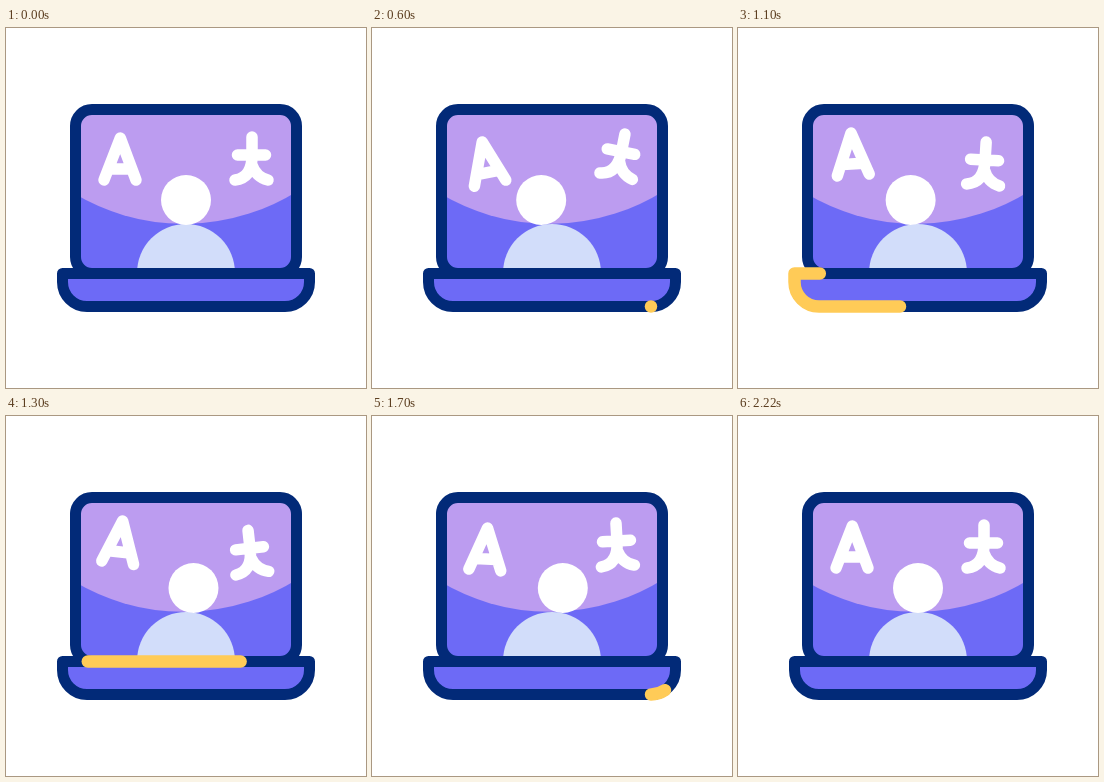
An HTML page for the animation above (2.4 s loop, 360 by 360 pixels).

```html
<!DOCTYPE html>
<html lang="en">
<head>
<meta charset="utf-8">
<title>Online translation</title>
<style>
  html, body { margin: 0; width: 100%; height: 100%; overflow: hidden; background: #fff; }
  svg { display: block; width: 100vw; height: 100vh; }
  .line { fill: none; stroke-linecap: round; stroke-linejoin: round; }
  .navy { stroke: #022a78; stroke-width: 11; }
  .glyph { stroke: #fff; stroke-width: 11.5; }
</style>
</head>
<body>
<svg viewBox="0 0 360 360">
  <defs>
    <clipPath id="screen"><rect x="69.5" y="81.5" width="221" height="164" rx="16.5"/></clipPath>
  </defs>
  <g clip-path="url(#screen)">
    <path fill="#6d6af6" d="M60 70H300V250H60Z"/>
    <path fill="#bc9cf0" d="M60 70H300V157.5A214 214 0 0 1 60 160.500Z"/>
    <circle fill="#d2ddfa" cx="180" cy="245" r="49"/>
  </g>
  <circle id="head" fill="#fff" cy="172" r="25"/>
  <path id="latin" class="line glyph" d="M98 152L114.300 110L130 152M104 141H125"/>
  <path id="hanzi" class="line glyph" d="M246 109V128Q246 150 229 152M231.500 127H259.500M246 137Q250 149 262 152"/>
  <rect class="line navy" x="69.5" y="81.5" width="221" height="164" rx="16.5"/>
  <path class="navy" fill="#6d6af6" stroke-linejoin="round"
    d="M279 278.500H81A24.500 24.500 0 0 1 56.500 254V245.500H303.500V254A24.500 24.500 0 0 1 279 278.500Z"/>
  <path id="runner" class="line" stroke="#ffcb57" stroke-width="12.5" pathLength="1"
    d="M279 278.500H81A24.500 24.500 0 0 1 56.500 254V245.500H303.500V254A24.500 24.500 0 0 1 279 278.500"/>
</svg>
<script>
  const LOOP = 2400;
  const [head, latin, hanzi, runner] =
    ['head', 'latin', 'hanzi', 'runner'].map(id => document.getElementById(id));

  const ease = u => u * u * (3 - 2 * u);

  // Eased value at time t through [time, value] keys.
  function track(t, keys) {
    if (t <= keys[0][0]) return keys[0][1];
    for (let i = 1; i < keys.length; i++) {
      const [t0, a] = keys[i - 1], [t1, b] = keys[i];
      if (t < t1) return a + (b - a) * ease((t - t0) / (t1 - t0));
    }
    return keys[keys.length - 1][1];
  }

  const headX = [[200, 180], [500, 169.2], [1000, 169.2], [1400, 190.8], [1900, 190.8], [2200, 180]];
  const tilt = [[200, 0], [800, 15], [1400, -8], [2000, 1.5], [2200, 0]];
  const lift = [[200, 0], [700, 4], [1200, -6], [1700, 2], [2200, 0]];
  const runHead = [[600, 0], [1600, 1]];
  const runTail = [[800, 0], [1800, 1]];

  function pose(el, y, angle, cx, cy) {
    el.setAttribute('transform', `translate(0 ${y}) rotate(${angle} ${cx} ${cy})`);
  }

  function draw(t) {
    head.setAttribute('cx', track(t, headX));
    const angle = track(t, tilt), y = track(t, lift);
    pose(latin, y, -angle, 114, 131);
    pose(hanzi, -y, angle, 246, 145);

    const start = track(t, runTail), end = track(t, runHead);
    runner.setAttribute('visibility', end > start ? 'visible' : 'hidden');
    runner.setAttribute('stroke-dasharray', `${end - start} 2`);
    runner.setAttribute('stroke-dashoffset', -start);
  }

  const began = performance.now();
  function tick() {
    draw((performance.now() - began) % LOOP);
    requestAnimationFrame(tick);
  }
  tick();
</script>
</body>
</html>
```
